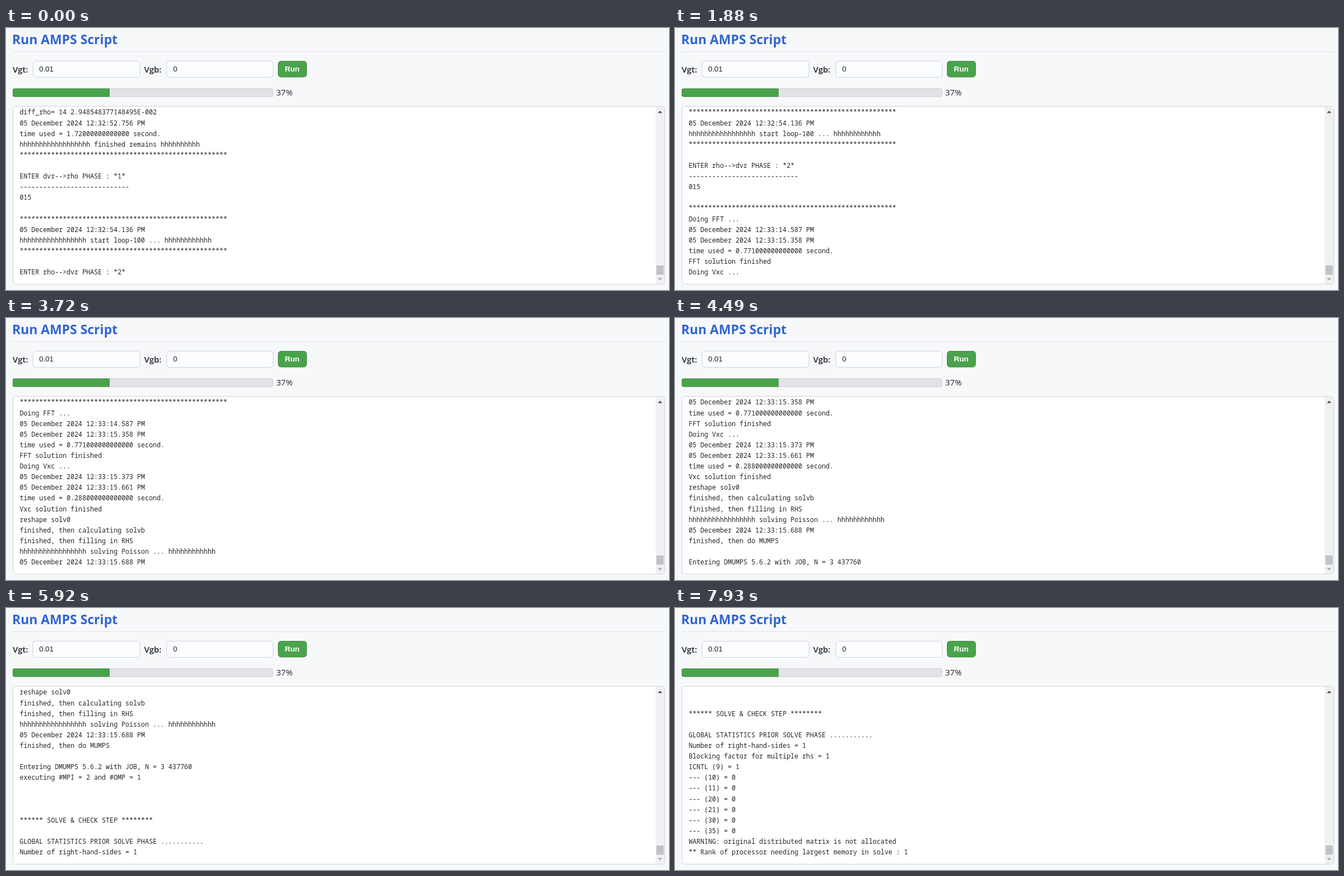
An HTML page for the animation above (8 s loop, 1190 by 470 pixels).

```html
<!DOCTYPE html>
<html lang="en">
<head>
<meta charset="utf-8">
<title>Run AMPS Script</title>
<style>
  html, body { margin: 0; width: 100%; height: 100%; overflow: hidden; background: #f7f8fa; }
  svg { display: block; width: 100%; height: 100%; }
  text { font-family: "Open Sans", "Noto Sans", sans-serif; fill: #212529; white-space: pre; }
  .title { font-size: 23.1px; font-weight: 700; fill: #3065d0; }
  .label { font-size: 15px; font-weight: 600; }
  .value { font: 13.33px "Liberation Sans", Arial, sans-serif; }
  .percent { font-size: 15px; }
  .button { font: 700 13.6px "Liberation Sans", Arial, sans-serif; fill: #fff; }
  #log text { font: 500 11.73px "Noto Sans Mono", monospace; }
  .field { fill: #fbfdfe; stroke: #ced4da; }
  .green { fill: #4aa34c; stroke: #3b9041; }
</style>
</head>
<body>
<svg viewBox="0 0 1190 470">
  <rect width="1190" height="470" fill="#f7f8fa"/>
  <text class="title" x="11" y="29">Run AMPS Script</text>
  <path d="M12 42.5H1183" stroke="#dee2e6"/>

  <text class="label" x="12" y="80">Vgt:</text>
  <rect class="field" x="48.5" y="59.5" width="192" height="29" rx="5"/>
  <text class="value" x="59.5" y="78">0.01</text>
  <text class="label" x="248" y="80">Vgb:</text>
  <rect class="field" x="288.5" y="59.5" width="191" height="29" rx="5"/>
  <text class="value" x="300" y="78">0</text>
  <rect class="green" x="488.5" y="59.5" width="51" height="28.500" rx="5"/>
  <text class="button" x="500.5" y="78">Run</text>

  <rect x="12.5" y="108.5" width="467" height="15" rx="4" fill="#e2e3e7" stroke="#d0d3d8"/>
  <path class="green" d="M185.5 109H14.5a2 2 0 0 0-2 2V121a2 2 0 0 0 2 2H185.500z"/>
  <text class="percent" x="485" y="121">37%</text>

  <rect x="12.5" y="140.5" width="1170" height="319" rx="5" fill="#fff" stroke="#ced4da"/>
  <path d="M1166 141H1178a4 4 0 0 1 4 4V455a4 4 0 0 1-4 4H1166z" fill="#f0f0f3"/>
  <rect x="1167.5" y="426" width="13" height="16.500" fill="#c1c1c6"/>
  <path d="M1170 152.5l4-4 4 4z" fill="#484848"/>
  <path d="M1170 448.5l4 4 4-4z" fill="#a3a3a3"/>
  <g id="log"></g>
</svg>
<script>
const LOOP = 8000, ROWS = 16;
const stars = "*".repeat(53), dashes = "-".repeat(28);
const banner = (left, label, right) => `${"h".repeat(left)} ${label} ${"h".repeat(right)}`;
const stamp = time => `05 December 2024 12:${time} PM`;

const lines = [
  "diff_rho= 14 2.948548377148495E-002",
  stamp("32:52.756"),
  "time used = 1.72000000000000 second.",
  banner(18, "finished remains", 10),
  stars,
  "",
  "ENTER dvr-->rho PHASE : *1*",
  dashes,
  "015",
  "",
  stars,
  stamp("32:54.136"),
  banner(17, "start loop-100 ...", 12),
  stars,
  "",
  "ENTER rho-->dvr PHASE : *2*",
  dashes,
  "015",
  "",
  stars,
  "Doing FFT ...",
  stamp("33:14.587"),
  stamp("33:15.358"),
  "time used = 0.771000000000000 second.",
  "FFT solution finished",
  "Doing Vxc ...",
  stamp("33:15.373"),
  stamp("33:15.661"),
  "time used = 0.288000000000000 second.",
  "Vxc solution finished",
  "reshape solv0",
  "finished, then calculating solvb",
  "finished, then filling in RHS",
  banner(17, "solving Poisson ...", 12),
  stamp("33:15.688"),
  "finished, then do MUMPS",
  "",
  "Entering DMUMPS 5.6.2 with JOB, N = 3 437760",
  "executing #MPI = 2 and #OMP = 1",
  "", "", "",
  "****** SOLVE & CHECK STEP ********",
  "",
  "GLOBAL STATISTICS PRIOR SOLVE PHASE ...........",
  "Number of right-hand-sides = 1",
  "Blocking factor for multiple rhs = 1",
  "ICNTL (9) = 1",
  ...[10, 11, 20, 21, 30, 35].map(n => `--- (${n}) = 0`),
  "WARNING: original distributed matrix is not allocated",
  "** Rank of processor needing largest memory in solve : 1",
];

// Each moment appends one line and scrolls the log by one row.
const scrollTimes = [
  100, 300, 500, 700, 920, 1070, 1320, 1500, 1690, 1880,
  2080, 2280, 2500, 2700, 2900, 3110, 3310, 3520, 3720, 3920,
  4110, 4310, 4500, 4690, 4910, 5110, 5310, 5510, 5720, 5920,
  6120, 6320, 6510, 6710, 6930, 7130, 7330, 7530, 7730, 7930,
];

const log = document.getElementById("log");
const rows = Array.from({ length: ROWS }, (_, row) => {
  const text = document.createElementNS("http://www.w3.org/2000/svg", "text");
  text.setAttribute("x", 24.4);
  text.setAttribute("y", Math.round(155.4 + 19.12 * row));
  return log.appendChild(text);
});

let shownTop = -1;
function draw() {
  const time = performance.now() % LOOP;
  const top = scrollTimes.filter(t => t <= time).length;
  if (top !== shownTop) {
    rows.forEach((text, row) => { text.textContent = lines[top + row]; });
    shownTop = top;
  }
  requestAnimationFrame(draw);
}
draw();
</script>
</body>
</html>
```
